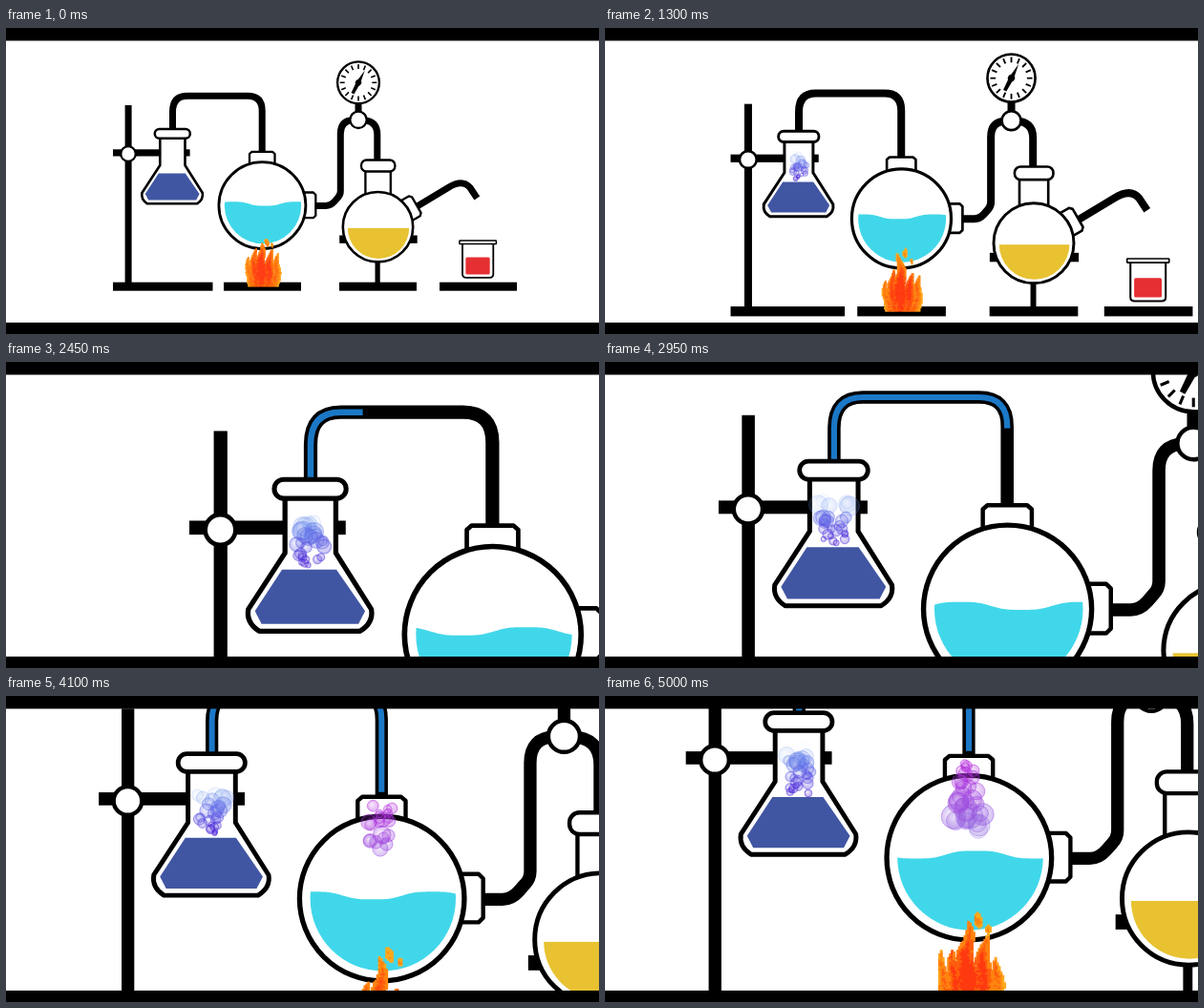
Write an HTML page with a canvas that moves like this. It is 621 by 321 pixels and loops after 5050 ms.

```html
<!DOCTYPE html>
<html lang="en">
<head>
<meta charset="utf-8">
<title>Laboratory</title>
<style>
  html, body { margin: 0; width: 100%; height: 100%; overflow: hidden; background: #fff; }
  canvas { display: block; }
</style>
</head>
<body>
<canvas id="stage" width="621" height="321"></canvas>
<script>
const ctx = document.getElementById('stage').getContext('2d');
const LOOP = 5050, STEP = 50, TAU = Math.PI * 2;

// Camera keys: time, scale, x shift, y shift
const CAMERA = [
  [900, 1, 0, 0], [1100, 1.035, 0, -2.7], [1300, 1.144, 3.4, -13],
  [1750, 1.492, 11.5, -46.2], [2150, 1.88, 14, -80], [2450, 2.032, -35.6, -92.2],
  [2750, 1.97, -77, -98], [3200, 1.9, -117, -104], [3500, 1.894, -116.9, -106],
  [4100, 1.896, -115.2, -140.3], [5000, 1.897, -127.8, -183.4], [5050, 1.897, -128.2, -185]
];

const clamp = (v, lo = 0, hi = 1) => Math.min(hi, Math.max(lo, v));
const mix = (a, b, k) => a + (b - a) * k;
const smooth = k => k * k * (3 - 2 * k);
const random = n => { const v = Math.sin(n * 127.1 + 11.7) * 43758.5453; return v - Math.floor(v); };

function cameraAt(t) {
  t = Math.max(t, CAMERA[0][0]);
  const last = CAMERA.length - 1;
  let i = 0;
  while (i < last - 1 && t >= CAMERA[i + 1][0]) i++;
  const a = CAMERA[i], b = CAMERA[i + 1], span = b[0] - a[0], u = (t - a[0]) / span;
  const slope = (k, c) => {
    if (k === 0) return 0;
    const p = CAMERA[k - 1], q = CAMERA[Math.min(k + 1, last)];
    return (q[c] - p[c]) / (q[0] - p[0]);
  };
  return [1, 2, 3].map(c =>
    mix(a[c], b[c], smooth(u)) +
    span * u * (1 - u) * ((1 - u) * slope(i, c) - u * slope(i + 1, c)));
}

function paint(path, fill, stroke, width) {
  if (fill) { ctx.fillStyle = fill; ctx.fill(path); }
  if (stroke) { ctx.strokeStyle = stroke; ctx.lineWidth = width; ctx.stroke(path); }
}
const outline = (path, width = 2.3) => paint(path, '#fff', '#000', width);
const pipe = path => paint(path, null, '#000', 7);

function block(x, y, w, h, color = '#000') {
  ctx.fillStyle = color;
  ctx.fillRect(x, y, w, h);
}
function circle(x, y, r) {
  const p = new Path2D();
  p.arc(x, y, r, 0, TAU);
  return p;
}
function rounded(x, y, w, h, r) {
  const p = new Path2D();
  p.roundRect(x, y, w, h, r);
  return p;
}

const TUBE = new Path2D('M174.5 108 V88 Q174.5 71.3 190 71.3 H253 Q268.2 71.3 268.2 87 V131');
const TUBE_LENGTH = 174;
const ERLENMEYER = new Path2D('M161.3 114 V144 L142.4 173 Q141.2 180 148 184.3 H200 Q207 180 205.8 173 L187.5 144 V114');
const ERLENMEYER_FILL = new Path2D('M159.8 152.5 H187.8 L202.6 174 L199.2 180.6 H149.2 L145.8 174 Z');

function stand() {
  block(124.6, 81, 7, 188);
  block(112, 127.3, 80.6, 7.2);
  outline(circle(128, 132, 7.8));
  block(112, 266.7, 104.5, 9);
  block(228, 266.7, 81, 9);
  block(349, 266.7, 81, 9);
  block(454, 266.7, 81, 9);
}

function tube(t) {
  pipe(TUBE);
  const filled = clamp((t - 2080) / 1120) * TUBE_LENGTH;
  if (!filled) return;
  ctx.setLineDash([filled, 999]);
  paint(TUBE, null, '#1b78c6', 3.2);
  ctx.setLineDash([]);
}

function bubbles(t, o) {
  const every = 42;
  for (let i = 0; o.start + i * every < t; i++) {
    const age = (t - o.start - i * every) / (o.life * mix(.7, 1.1, random(i + o.seed)));
    if (age >= 1) continue;
    const side = random(i * 3 + o.seed + 1) * 2 - 1;
    const x = o.x + side * mix(o.spread * .65, o.spread, age);
    const y = o.y + o.travel * age;
    const r = mix(o.size * .35, o.size, age) * mix(.6, 1.1, random(i * 7 + o.seed));
    const color = o.from.map((c, k) => Math.round(mix(c, o.to[k], age))).join();
    const alpha = age < .7 ? 1 : (1 - age) / .3;
    const glow = ctx.createRadialGradient(x - r * .25, y - r * .25, 0, x, y, r);
    glow.addColorStop(0, `rgba(${color},${.08 * alpha})`);
    glow.addColorStop(1, `rgba(${color},${.38 * alpha})`);
    paint(circle(x, y, r), glow, `rgba(${color},${.5 * alpha})`, .5);
  }
}

function erlenmeyer(t) {
  outline(ERLENMEYER, 2.6);
  paint(ERLENMEYER_FILL, '#4156a2');
  bubbles(t, { seed: 5, start: 250, life: 1450, x: 174.4, y: 150.5, travel: -24, spread: 9,
    size: 5.6, from: [75, 30, 215], to: [115, 165, 240] });
  outline(rounded(155.8, 106, 37, 9.8, 4.8), 2.5);
}

function roundFlask(t) {
  outline(new Path2D('M255 143 V132 L257.5 129.8 H279 L281.5 132 V143 Z'));
  outline(new Path2D('M311 172.5 H321.8 L324.3 175 V196.7 L321.8 199.2 H311 Z'));
  outline(circle(268.4, 186.1, 45.5), 2.8);

  const crest = 238 + t * .0464;
  ctx.save();
  ctx.clip(circle(269, 186, 40.2));
  ctx.beginPath();
  ctx.moveTo(228, 230);
  for (let x = 228; x <= 310; x++)
    ctx.lineTo(x, 186.5 - 4.2 * smooth(Math.cos(Math.PI * (x - crest) / 66) ** 2));
  ctx.lineTo(310, 230);
  ctx.fillStyle = '#41d7ea';
  ctx.fill();
  ctx.restore();

  bubbles(t, { seed: 40, start: 3270, life: 1850, x: 267.5, y: 134, travel: 44, spread: 10,
    size: 8.2, from: [180, 35, 220], to: [135, 125, 225] });
}

function flame(t) {
  // Tongues: centre, height, half width
  const tongues = [[-15, 31, 5], [-9, 37, 7], [-2, 50, 9], [8, 39, 8], [15, 32, 6]];
  const tick = t / STEP;
  const shapes = tongues.map(([x, h, w], i) => [x, h * (1 + .1 * Math.sin(tick * .9 + i * 2.1)), w]);
  const embers = [[4, 46 + tick * 1.3 % 9, 4.5], [9, 43 + tick * 1.7 % 7, 2.5]];
  for (let h = 0; h < 60; h++) {
    const sway = Math.sin(h * .2 - tick * .7) * h * .045;
    const spread = mix(.72, 1, Math.min(1, h / 14));
    for (let x = -20; x <= 20; x++) {
      const grain = random(x * 57 + h * 131 + tick);
      let depth = 0;
      for (const [center, height, width] of shapes) {
        if (h >= height) continue;
        const half = width * (1 - h / height) ** .65;
        depth = Math.max(depth, 1 - Math.abs(x - center * spread - sway) / half);
      }
      for (const [center, height, size] of embers)
        depth = Math.max(depth, 1 - Math.hypot((x - center - sway * .5) * 2 / size, (h - height) / size));
      if (depth <= grain * .12) continue;
      const core = 1 - Math.hypot(x / 19, (h - 19) / 32);
      const heat = core * .8 + depth * .4 + grain * .2;
      const color = heat > .82 ? '#ff3a10' : heat > .6 ? '#ff5e0e' : heat > .3 ? '#ff8510' : '#ffa91e';
      block(268.3 + x, 270 - h, 1.5, 1.5, color);
    }
  }
}

function gauge() {
  pipe(new Path2D('M369 76 V94'));
  outline(circle(369, 57.3, 21.9));
  ctx.save();
  ctx.translate(369, 57.3);
  for (let i = 0; i < 16; i++) {
    block(-.8, -19.3, 1.6, 5);
    ctx.rotate(TAU / 16);
  }
  ctx.rotate(.48);
  paint(new Path2D('M0 -14.5 L2.2 0 L1.6 13 H-1.6 L-2.2 0 Z'), '#000');
  paint(circle(0, 0, 3.2), '#000');
  ctx.restore();
}

function connector() {
  pipe(new Path2D('M324 186.5 H335 Q340 186.5 344 182 L347.5 178 Q350.3 175 350.3 171 V111 Q350.3 97 364 96.5 H373 Q388.8 97 388.8 112 V140'));
  gauge();
  outline(circle(369, 96.3, 8.7));
}

function receiver() {
  block(349.2, 217.5, 81.5, 8.3);
  block(386.5, 244, 5.2, 25);
  pipe(new Path2D('M429 188 L463 167.5 Q478 158 486 167.5 L493.3 178.5'));
  outline(rounded(376.4, 148, 26.4, 32, 0));
  outline(rounded(372, 138.5, 35.4, 12, 5.5));
  ctx.save();
  ctx.translate(389.5, 208.7);
  ctx.rotate(-.52);
  outline(new Path2D('M30 -12 H44 L46.5 -9.5 V9.5 L44 12 H30 Z'));
  ctx.restore();
  outline(circle(389.5, 208.7, 36.7), 2.6);
  ctx.save();
  ctx.clip(circle(390, 209.8, 32.2));
  block(350, 210, 80, 40, '#e8c231');
  ctx.restore();
}

function beaker() {
  outline(new Path2D('M478 226 V258 Q478 261.8 482 261.8 H506.5 Q510.3 261.8 510.3 258 V226 Z'), 1.8);
  outline(rounded(474.9, 222.9, 38.5, 3.6, .5), 1.5);
  paint(rounded(481.4, 240.6, 25.3, 17.8, 1.5), '#e52f32');
}

function frame(now) {
  const t = Math.floor(now % LOOP / STEP) * STEP;
  const [scale, x, y] = cameraAt(t);
  ctx.setTransform(1, 0, 0, 1, 0, 0);
  block(0, 0, 621, 321, '#fff');
  ctx.setTransform(scale, 0, 0, scale, x, y);
  ctx.lineJoin = 'round';
  stand();
  tube(t);
  erlenmeyer(t);
  connector();
  roundFlask(t);
  flame(t);
  receiver();
  beaker();
  ctx.setTransform(1, 0, 0, 1, 0, 0);
  block(0, 13, 621, 1, 'rgba(0,0,0,.4)');
  block(0, 0, 621, 13);
  block(0, 309, 621, 12);
}

let start;
function loop(now) {
  start ??= now;
  frame(Math.max(0, now - start));
  requestAnimationFrame(loop);
}
frame(0);
requestAnimationFrame(loop);
</script>
</body>
</html>
```
